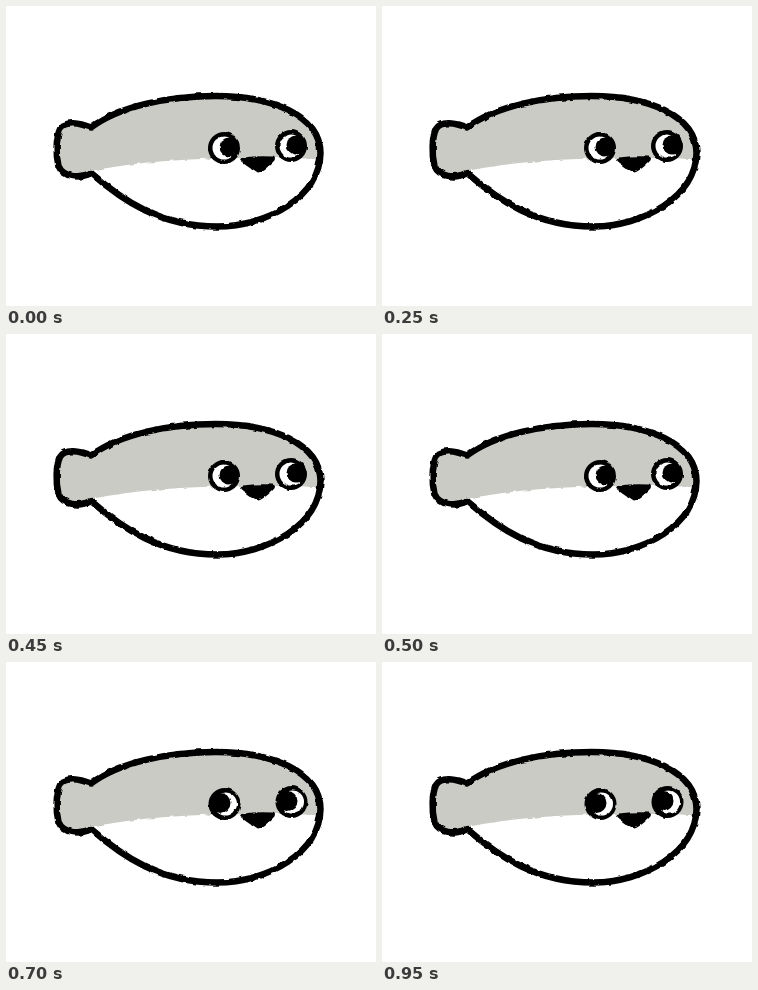
These frames come from a looping animation (370x300 px, 1 s). An HTML page without scripts:

```html
<!DOCTYPE html>
<html lang="en">
<head>
<meta charset="utf-8">
<title>Fish looking around</title>
<style>
  html, body { margin: 0; width: 100%; height: 100%; overflow: hidden; background: #fff; }
  svg { display: block; width: 100vw; height: 100vh; }

  /* The gaze flips once per loop; the line wobbles every 50 ms. */
  .ahead { animation: ahead 1s step-end infinite; }
  .back { animation: back 1s step-end infinite; }
  .even { animation: even .1s step-end infinite; }
  .odd { animation: odd .1s step-end infinite; }
  @keyframes ahead { 0% { opacity: 1 } 60%, 100% { opacity: 0 } }
  @keyframes back { 0% { opacity: 0 } 60%, 100% { opacity: 1 } }
  @keyframes even { 0% { opacity: 1 } 50%, 100% { opacity: 0 } }
  @keyframes odd { 0% { opacity: 0 } 50%, 100% { opacity: 1 } }
</style>
</head>
<body>
<svg viewBox="0 0 370 300">
  <defs>
    <filter id="wobble1" filterUnits="userSpaceOnUse" x="0" y="0" width="370" height="300" color-interpolation-filters="sRGB">
      <feTurbulence type="fractalNoise" baseFrequency=".13" numOctaves="2" seed="3"/>
      <feDisplacementMap in="SourceGraphic" scale="3" xChannelSelector="R" yChannelSelector="G"/>
    </filter>
    <filter id="wobble2" filterUnits="userSpaceOnUse" x="0" y="0" width="370" height="300" color-interpolation-filters="sRGB">
      <feTurbulence type="fractalNoise" baseFrequency=".13" numOctaves="2" seed="8"/>
      <feDisplacementMap in="SourceGraphic" scale="3" xChannelSelector="R" yChannelSelector="G"/>
    </filter>

    <path id="outline" d="M85 121.500C114 100 163 90 210 90C265 90 314 109 314.500 147C314 190 262 220.500 211 220.500C155 220.500 117 195 85 167C73 173 57 171 52.500 160C49.500 148 50 132 54 123C59 114 74 117 85 121.500Z"/>
    <clipPath id="inside"><use href="#outline"/></clipPath>

    <g id="body">
      <use href="#outline" fill="#fff"/>
      <path clip-path="url(#inside)" fill="#cbcbc6" d="M40 80H325V154Q300 152 268 152Q150 151 85 165L82 180H40Z"/>
      <use href="#outline" fill="none" stroke="#000" stroke-width="6.500" stroke-linejoin="round"/>
      <path d="M237 151.500Q251 149.500 267 150.500Q271 152 267 156Q260 163 254 166Q251 167.500 247 164Q239 159 234.500 155Q233 152.500 237 151.500Z"/>
    </g>

    <g id="eyeAhead">
      <circle r="16"/>
      <circle r="11.500" fill="#fff"/>
      <circle cx="5" cy="-1" r="9.500"/>
    </g>
    <g id="eyeBack">
      <circle r="16"/>
      <circle cx="1" r="11.500" fill="#fff"/>
      <circle cx="-4" cy="-1" r="10"/>
    </g>

    <g id="fishAhead">
      <use href="#body"/>
      <use href="#eyeAhead" x="218" y="142"/>
      <use href="#eyeAhead" x="285" y="140"/>
    </g>
    <g id="fishBack">
      <use href="#body"/>
      <use href="#eyeBack" x="218.500" y="142"/>
      <use href="#eyeBack" x="285.500" y="140"/>
    </g>
  </defs>

  <g class="ahead">
    <g class="even"><use href="#fishAhead" filter="url(#wobble1)"/></g>
    <g class="odd"><use href="#fishAhead" filter="url(#wobble2)"/></g>
  </g>
  <g class="back">
    <g class="even"><use href="#fishBack" filter="url(#wobble1)"/></g>
    <g class="odd"><use href="#fishBack" filter="url(#wobble2)"/></g>
  </g>
</svg>
</body>
</html>
```
